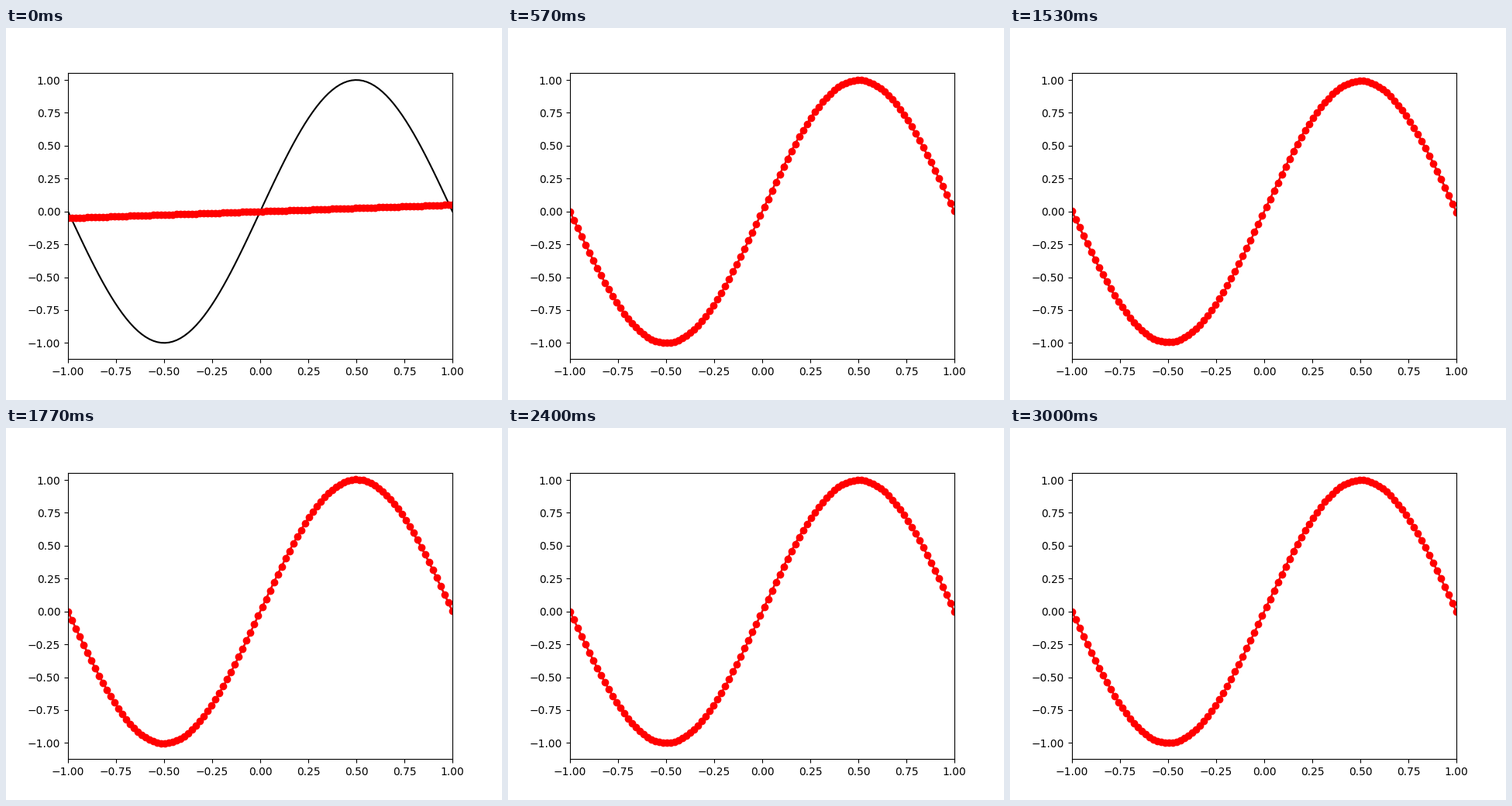
Animation, 640 px wide and 480 px high, one loop 3.03 s. Source, as a matplotlib script:

```python
import numpy as np
import matplotlib.pyplot as plt
from matplotlib.animation import FuncAnimation

FRAMES, INTERVAL = 101, 30
PEAK = 4        # step at which the fit overshoots most
SETTLED = 19    # step at which the fit first matches the curve
PERIOD = 24.5   # steps per wobble once settled

x = np.linspace(-1, 1, 100)
target = np.sin(np.pi * x)


def fit(n):
    """Fitted curve at step n: a growing sine, a fading tilt, a small wobble."""
    k = n / PEAK
    amp = 1 - np.exp(-k ** 2)
    tilt = 0.0505 * np.exp(-k) + 0.7 * (k * np.exp(1 - k)) ** 3
    phase = 2 * np.pi * (n - SETTLED) / PERIOD
    wobble = -0.012 * amp * (1 - n / (FRAMES - 1)) * np.sin(phase)
    return amp * target + tilt * x + wobble * (x + target / 2)


fig, ax = plt.subplots(figsize=(6.4, 4.8), dpi=100)
ax.plot(x, target, "k-")
line, = ax.plot(x, fit(0), "ro-")
ax.set_xlim(-1, 1)
ax.set_ylim(-1.1231, 1.0559)


def update(n):
    line.set_ydata(fit(n))
    return line,


anim = FuncAnimation(fig, update, frames=FRAMES, interval=INTERVAL,
                     repeat=True, repeat_delay=0)
plt.show()
```
